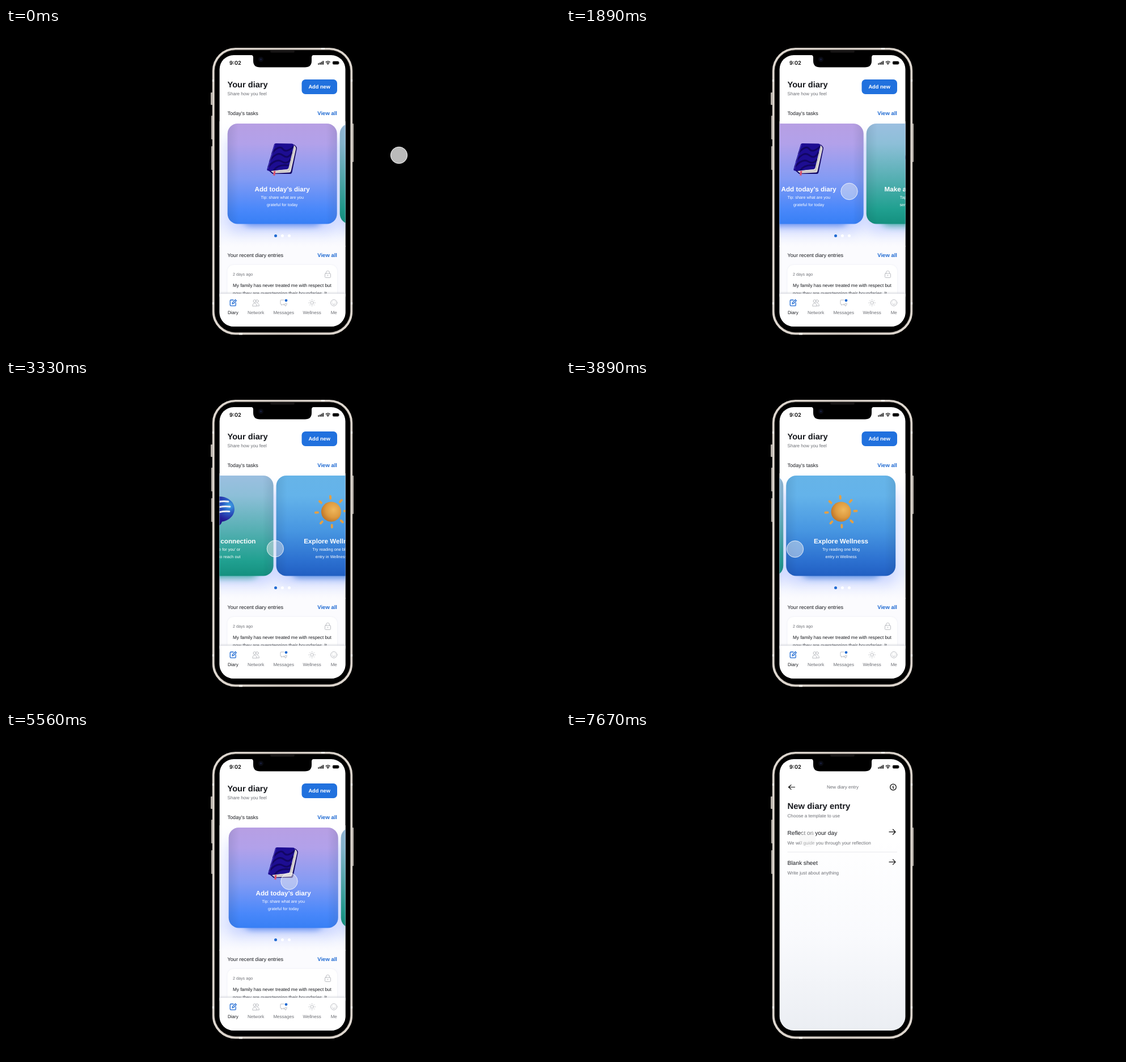
An HTML page that plays this animation: 977 px wide and 573 px high, repeating every 8 s.

```html
<!DOCTYPE html>
<html lang="en">
<head>
<meta charset="utf-8">
<title>Diary app</title>
<style>
  html, body { margin: 0; width: 100%; height: 100%; overflow: hidden; background: #000; }
  svg { display: block; width: 100vw; height: 100vh; }
  text { font-family: "Liberation Sans", Arial, sans-serif; fill: #16181d; text-rendering: geometricPrecision; white-space: pre; }
  .bold { font-weight: 700; }
  .mid { text-anchor: middle; }
  .end { text-anchor: end; }
  .muted { fill: #6c6e74; }
  .blue { fill: #1f6ad2; }
  .white text { fill: #fff; text-anchor: middle; font-size: 7.25px; }
  .white .bold { font-size: 11.65px; }
  .icon { fill: none; stroke: #b4b6bb; stroke-width: .9; stroke-linecap: round; stroke-linejoin: round; }
  .arrow { fill: none; stroke: #111; stroke-width: 1.3; stroke-linecap: round; stroke-linejoin: round; }
</style>
</head>
<body>
<svg viewBox="0 0 977 573" xmlns="http://www.w3.org/2000/svg">
  <defs>
    <clipPath id="screen"><rect x="376.6" y="48" width="221.9" height="480" rx="25"/></clipPath>
    <clipPath id="entry"><rect x="376" y="380" width="224" height="90"/></clipPath>
    <clipPath id="cover"><path id="coverShape" d="M473 205.500Q474 204 476 204L504 204.500Q508.500 205 507.500 209L498.500 247Q497.500 250 494 250L464 252.500Q459.500 253 460.500 249Z"/></clipPath>
    <linearGradient id="g0" x2="0" y2="1">
      <stop stop-color="#b79fe3"/><stop offset=".2" stop-color="#b2a1ea"/><stop offset=".55" stop-color="#839bf4"/><stop offset=".85" stop-color="#4a88fa"/><stop offset="1" stop-color="#377ff5"/>
    </linearGradient>
    <linearGradient id="g1" x2="0" y2="1">
      <stop stop-color="#9bbfe0"/><stop offset=".2" stop-color="#8dbfd8"/><stop offset=".55" stop-color="#55afb2"/><stop offset=".85" stop-color="#20a090"/><stop offset="1" stop-color="#14907f"/>
    </linearGradient>
    <linearGradient id="g2" x2="0" y2="1">
      <stop stop-color="#66b4e8"/><stop offset=".2" stop-color="#64b3ea"/><stop offset=".55" stop-color="#4796e1"/><stop offset=".85" stop-color="#2c70d0"/><stop offset="1" stop-color="#215fc2"/>
    </linearGradient>
    <linearGradient id="edge">
      <stop stop-color="#123" stop-opacity=".1"/><stop offset=".1" stop-color="#123" stop-opacity="0"/><stop offset=".9" stop-color="#123" stop-opacity="0"/><stop offset="1" stop-color="#123" stop-opacity=".1"/>
    </linearGradient>
    <linearGradient id="glow" x2="0" y2="1">
      <stop stop-color="#fff"/><stop offset=".35" stop-color="#f3f5ff"/><stop offset=".8" stop-color="#e9eeff"/><stop offset="1" stop-color="#fbfbfe"/>
    </linearGradient>
    <linearGradient id="sheet" x2="0" y2="1">
      <stop offset=".3" stop-color="#fff"/><stop offset=".65" stop-color="#f9fafd"/><stop offset="1" stop-color="#ebeef3"/>
    </linearGradient>
    <linearGradient id="metal">
      <stop stop-color="#a9a29b"/><stop offset=".006" stop-color="#e0d9d1"/><stop offset=".5" stop-color="#cfc7bf"/><stop offset=".994" stop-color="#e0d9d1"/><stop offset="1" stop-color="#a9a29b"/>
    </linearGradient>
    <radialGradient id="bubble" cx=".85" cy=".3" r=".9">
      <stop stop-color="#3fa4e6"/><stop offset=".25" stop-color="#2b5cc4"/><stop offset=".55" stop-color="#241b96"/><stop offset="1" stop-color="#160a63"/>
    </radialGradient>
    <radialGradient id="sunball" cx=".62" cy=".4" r=".65">
      <stop stop-color="#efb75c"/><stop offset=".6" stop-color="#dd9a3f"/><stop offset="1" stop-color="#bd7328"/>
    </radialGradient>
    <filter id="soft" x="-30%" y="-100%" width="160%" height="300%"><feGaussianBlur stdDeviation="6"/></filter>
    <filter id="haze" x="-30%" y="-30%" width="160%" height="160%"><feGaussianBlur stdDeviation="10"/></filter>
    <filter id="faint" x="-50%" y="-50%" width="200%" height="200%"><feGaussianBlur stdDeviation="1.5"/></filter>
    <path id="arrowRight" class="arrow" d="M0 0H11M6.500-4.500L11 0L6.500 4.500"/>
  </defs>

  <rect width="977" height="573"/>

  <!-- phone body -->
  <g fill="#b9b2ab">
    <rect x="361" y="114" width="4" height="22" rx="1"/><rect x="362" y="155" width="3" height="42" rx="1"/>
    <rect x="362" y="209" width="3" height="42" rx="1"/><rect x="610" y="169" width="3" height="68" rx="1"/>
  </g>
  <rect x="363.700" y="35" width="247.600" height="507.500" rx="41" fill="url(#metal)"/>
  <path d="M556 36.500H562M411 541H417M365.500 91V95M609.500 91V95M365.500 485V489M609.500 485V489" stroke="#f4f0ea" stroke-width="3"/>
  <rect x="367.700" y="38.800" width="239.600" height="499.600" rx="37" stroke="#6f6963" stroke-width=".7"/>

  <g clip-path="url(#screen)">
    <g id="home">
      <rect x="376" y="48" width="224" height="481" fill="#fff"/>
      <rect x="376" y="385" width="224" height="90" fill="#fbfbfe"/>
      <rect x="376" y="165" width="224" height="222" fill="url(#glow)"/>

      <text x="390.500" y="105" class="bold" font-size="14.6">Your diary</text>
      <text x="390.500" y="119.300" class="muted" font-size="8.1">Share how you feel</text>
      <rect x="521.500" y="91" width="62.500" height="26" rx="6.500" fill="#2171de"/>
      <text x="552.700" y="107" class="bold mid" font-size="9.25" style="fill:#fff">Add new</text>
      <text x="390.500" y="154.300" font-size="9.1">Today’s tasks</text>
      <text x="584" y="154.300" class="bold blue end" font-size="9.5">View all</text>

      <g id="track">
        <g id="cards"></g>
        <g class="white">
          <!-- book -->
          <path d="M463 252L470 258L502 258Q504 257.500 504.500 255L513 213Q513.500 210 508 206Z" fill="#150a66"/>
          <path d="M467 253L472 257L500 255.500Q502 255 502.500 253L511.500 213Q511 209 507 207L497 249Z" fill="#dcd8d6"/>
          <path d="M470 255L499 252.500L509 210" fill="none" stroke="#a9a4ad" stroke-width=".7"/>
          <use href="#coverShape" fill="#1d0d92"/>
          <path clip-path="url(#cover)" d="M468 222Q482 206 488 214T508 209M464 236Q478 217 488 225T505 219M462 246Q476 230 486 236T502 232M472 252Q480 240 499 243" fill="none" stroke="#120665" stroke-width="3"/>
          <path d="M474 206L462 249" stroke="#4a3bc0" stroke-width="1" fill="none"/>
          <path d="M472.500 252.500L475.500 253L474 262L472.300 260L470.800 261.500Z" fill="#d9506e"/>
          <text x="487.200" y="289.200" class="bold">Add today’s diary</text>
          <text x="487.200" y="301.600">Tip: share what are you</text>
          <text x="487.200" y="314.600">grateful for today</text>
        </g>
        <g class="white" transform="translate(198)">
          <!-- speech bubble -->
          <path d="M487 206C503 206 515 215 515 228C515 241 504 249 493 250.500C492 255 488 258.500 482.500 260C485 257 485 254 484 251C470 250 459.500 241 459.500 229C459.500 215 471 206 487 206Z" fill="url(#bubble)"/>
          <path d="M479 217Q492 213.500 504 215M480.500 226.500Q494 222.500 507 224M481 235.500Q494 231.500 506 232.500" fill="none" stroke="#e9eaf2" stroke-width="3" stroke-linecap="round"/>
          <text x="487.500" y="289.200" class="bold">Make a new connection</text>
          <text x="487.500" y="301.600">Tap ‘I’m here for you’ or</text>
          <text x="487.500" y="314.600">send a hug to reach out</text>
        </g>
        <g class="white" transform="translate(396)">
          <!-- sun -->
          <g id="rays" stroke="#e2a046" stroke-width="4" stroke-linecap="round"></g>
          <circle cx="487.500" cy="233" r="17.500" fill="url(#sunball)"/>
          <text x="487.500" y="289.200" class="bold">Explore Wellness</text>
          <text x="487.500" y="301.600">Try reading one blog</text>
          <text x="487.500" y="314.600">entry in Wellness</text>
        </g>
      </g>

      <circle cx="475.500" cy="367.500" r="2.500" fill="#1f6ad2"/>
      <circle cx="487.500" cy="367.500" r="2.500" fill="#fff"/>
      <circle cx="499.500" cy="367.500" r="2.500" fill="#fff"/>

      <text x="390.500" y="405" font-size="9.15">Your recent diary entries</text>
      <text x="584" y="405" class="bold blue end" font-size="9.5">View all</text>
      <g clip-path="url(#entry)">
        <rect x="390.500" y="419" width="193.500" height="80" rx="11" fill="#e9ebf2" filter="url(#faint)"/>
        <rect x="390.500" y="419" width="193.500" height="80" rx="11" fill="#fff"/>
        <text x="400" y="437.700" class="muted" font-size="7.2">2 days ago</text>
        <g class="icon">
          <rect x="562.500" y="434" width="10" height="7.500" rx="1.200"/>
          <path d="M564.500 434V432.500A3 3 0 0 1 570.500 432.500V434M567.500 436.800V438.500"/>
        </g>
        <text x="400" y="457.600" font-size="8.2">My family has never treated me with respect but</text>
        <text x="400" y="471.600" font-size="8.2">now they are overstepping their boundaries. It</text>
      </g>

      <rect x="376" y="468" width="224" height="8" fill="#c5c8d0" opacity=".6" filter="url(#faint)"/>
      <rect x="376" y="470" width="224" height="60" fill="#fff"/>
      <g class="icon">
        <g stroke="#1f6ad2" stroke-width="1.300">
          <path d="M401 481H396.500Q395.300 481 395.300 482.200V490Q395.300 491.300 396.500 491.300H404Q405.200 491.300 405.200 490V486"/>
          <path d="M399 488L399.500 485.500L404.500 480.500L406.300 482.300L401.300 487.300Z"/>
        </g>
        <circle cx="438.500" cy="483" r="2.400"/><circle cx="442.800" cy="483" r="2.400"/>
        <path d="M434.800 491.500Q435 486.700 438.500 486.700T442 491.500ZM443.500 486.700Q446.300 487 446.500 491.500H442"/>
        <path d="M490 481H485Q484 481 484 482V487.500Q484 488.500 485 488.500H486V490.500L488.500 488.500H492Q493 488.500 493 487.500V486.500M495 486.500V489Q495 490 494 490H493.500V491.800L491 490H489.500"/>
        <circle cx="539.700" cy="486" r="2.600"/>
        <path d="M539.700 480.300V481.300M539.700 490.700V491.700M534 486H535M544.400 486H545.400M535.700 482L536.400 482.700M543 489.300L543.700 490M535.700 490L536.400 489.300M543 482.700L543.700 482"/>
        <circle cx="578.200" cy="486" r="5.500"/>
        <path d="M576 484.500V484.600M580.400 484.500V484.600M575.500 487.500Q578.200 490.500 580.900 487.500"/>
      </g>
      <circle cx="494" cy="481.800" r="2.400" fill="#1f6ad2"/>
      <g font-size="8">
        <text x="400.400" y="505.600" class="mid">Diary</text>
        <text x="440.600" y="505.600" class="mid muted">Network</text>
        <text x="489.700" y="505.600" class="mid muted">Messages</text>
        <text x="539.600" y="505.600" class="mid muted">Wellness</text>
        <text x="578.200" y="505.600" class="mid muted">Me</text>
      </g>
    </g>

    <g id="compose">
      <rect x="376" y="48" width="224" height="481" fill="url(#sheet)"/>
      <use href="#arrowRight" transform="translate(403.500 97.500) scale(-1 .85)"/>
      <text x="488" y="100.300" class="mid muted" font-size="8.05">New diary entry</text>
      <circle cx="577" cy="97.500" r="5.300" class="arrow"/>
      <path d="M576 97H577.200V100.200M577 94.800V94.900" class="arrow"/>
      <text x="390.500" y="136.300" class="bold" font-size="14.9">New diary entry</text>
      <text x="390.500" y="151" class="muted" font-size="8.15">Choose a template to use</text>
      <text x="390.500" y="182" font-size="10.2">Reflect on your day</text>
      <text x="390.500" y="198.700" class="muted" font-size="8.2">We will guide you through your reflection</text>
      <use href="#arrowRight" x="570" y="176.700"/>
      <path d="M390.500 212.300H584" stroke="#e3e4e8" stroke-width=".8"/>
      <text x="390.500" y="235.400" font-size="10.2">Blank sheet</text>
      <text x="390.500" y="251.800" class="muted" font-size="8.25">Write just about anything</text>
      <use href="#arrowRight" x="570" y="229.900"/>
    </g>

    <!-- status bar -->
    <text x="394" y="65.300" font-size="9.3" style="font-family:Inter,sans-serif;font-weight:600;fill:#000">9:02</text>
    <path d="M550.300 62.500h1.700v2.300h-1.700zM553 61.200h1.700v3.600h-1.700zM555.700 59.800h1.700v5h-1.700zM558.400 58.300h1.700v6.500h-1.700z"/>
    <path d="M563.800 60.600Q567.700 57.300 571.600 60.600M565.300 62.300Q567.700 60.400 570.100 62.300" fill="none" stroke="#000" stroke-width="1.300"/>
    <path d="M566.200 63.300Q567.700 62.200 569.200 63.300L567.700 65Z"/>
    <rect x="576" y="58.800" width="11" height="5.600" rx="1.700"/><rect x="587.500" y="60.500" width="1" height="2.200" rx=".5" fill="#777"/>
  </g>

  <!-- notch -->
  <path d="M432 47.500Q436 48 436 52V58Q436 69.500 448 69.500H527Q539 69.500 539 58V52Q539 48 543 47.500Z"/>
  <rect x="466" y="39.500" width="43" height="4" rx="2" fill="#171515"/>
  <circle cx="449.500" cy="55.500" r="4.500" fill="#0a0b12"/><circle cx="449.500" cy="55.500" r="1.800" fill="#161c38"/>

  <g id="cursor">
    <circle id="shade" cy="1" r="15.500" opacity=".22" filter="url(#faint)"/>
    <circle id="disc" r="14.700" fill="#f2f2f2" stroke="#fff" stroke-width="1"/>
  </g>
</svg>

<script>
const $ = id => document.getElementById(id);
const LOOP = 8000, FPS = 9, PITCH = 198, COMPOSE_AT = 5660;

// Card backgrounds with coloured drop shadows
const shadows = ["#3c73e8", "#149a86", "#2a6fd4"];
const box = (x, y, w, h, rest) => `<rect x="${x}" y="${y}" width="${w}" height="${h}" rx="18" ${rest}/>`;
$("cards").innerHTML = shadows.map((color, i) => {
  const x = 390.7 + i * PITCH;
  return box(x, 190, 193, 172, 'fill="#8fa6ff" opacity=".32" filter="url(#haze)"') +
    box(x + 24, 310, 145, 40, `fill="${color}" opacity=".75" filter="url(#soft)"`) +
    box(x, 169, 193, 177.5, `fill="url(#g${i})"`) +
    box(x, 169, 193, 177.5, 'fill="url(#edge)"');
}).join("");

$("rays").innerHTML = Array.from({ length: 8 }, (_, i) =>
  `<path d="M0-23.500V-27.500" transform="translate(487.500 233) rotate(${i * 45 - 3})"/>`).join("");

// [time, x, y]
const cursorPath = [
  [0, 693, 225], [110, 705, 231], [220, 715, 240], [330, 692, 258], [445, 692, 258],
  [555, 804, 343], [667, 804, 343], [778, 820, 362], [889, 815, 369], [1000, 750, 350],
  [1220, 585, 292], [1330, 540, 284], [1444, 552, 289], [1560, 552, 289], [1889, 499.5, 289],
  [2110, 430, 292], [2333, 405, 296], [2556, 440, 300], [2889, 558, 300], [3000, 588, 299],
  [3111, 575, 299], [3444, 425, 298], [3889, 404, 299], [4111, 520, 295], [4222, 530, 292],
  [4444, 415, 290], [4556, 444, 290], [4778, 550, 286], [5000, 565, 280], [5333, 515, 267],
  [5556, 499.5, 264], [6000, 500, 266], [6111, 499, 286], [6333, 485, 305], [6556, 468, 314],
  [6889, 453, 294], [7222, 436, 220], [7444, 426, 190], [LOOP, 426, 188]
];
// [time, carousel offset]
const scrollPath = [
  [0, 0], [1560, 0], [1889, -59], [2111, -140], [2333, -180], [2667, -193], [2889, -195],
  [3050, -198], [3333, -310], [3556, -375], [3778, -397], [3889, -398.5], [4111, -270],
  [4333, -198], [4444, -150], [4556, -75], [4778, -15], [5000, 0], [5333, 0], [5556, 2], [LOOP, 2]
];
const presses = [[1650, 2110], [3050, 3500], [3880, 4150], [5450, COMPOSE_AT], [7660, LOOP]];

function sample(path, t) {
  const i = path.findIndex(p => p[0] > t);
  const a = path[i - 1], b = path[i], k = (t - a[0]) / (b[0] - a[0]);
  return a.slice(1).map((v, n) => v + (b[n + 1] - v) * k);
}

function draw(now) {
  // The motion advances in nine even steps per second
  const t = Math.floor((now % LOOP) * FPS / 1000 + 0.05) * 1000 / FPS % LOOP;
  const [x, y] = sample(cursorPath, t);
  const pressed = presses.some(([from, to]) => t >= from && t < to);
  const composing = t >= COMPOSE_AT;

  $("track").setAttribute("transform", `translate(${sample(scrollPath, t)[0]})`);
  $("cursor").setAttribute("transform", `translate(${x} ${y})`);
  $("disc").setAttribute("fill-opacity", pressed ? 0.45 : 0.77);
  $("disc").setAttribute("stroke-opacity", pressed ? 0.75 : 0.9);
  $("shade").style.display = pressed ? "none" : "";
  $("home").style.display = composing ? "none" : "";
  $("compose").style.display = composing ? "" : "none";
}

const start = performance.now();
function tick() {
  draw(performance.now() - start);
  requestAnimationFrame(tick);
}
tick();
</script>
</body>
</html>
```
